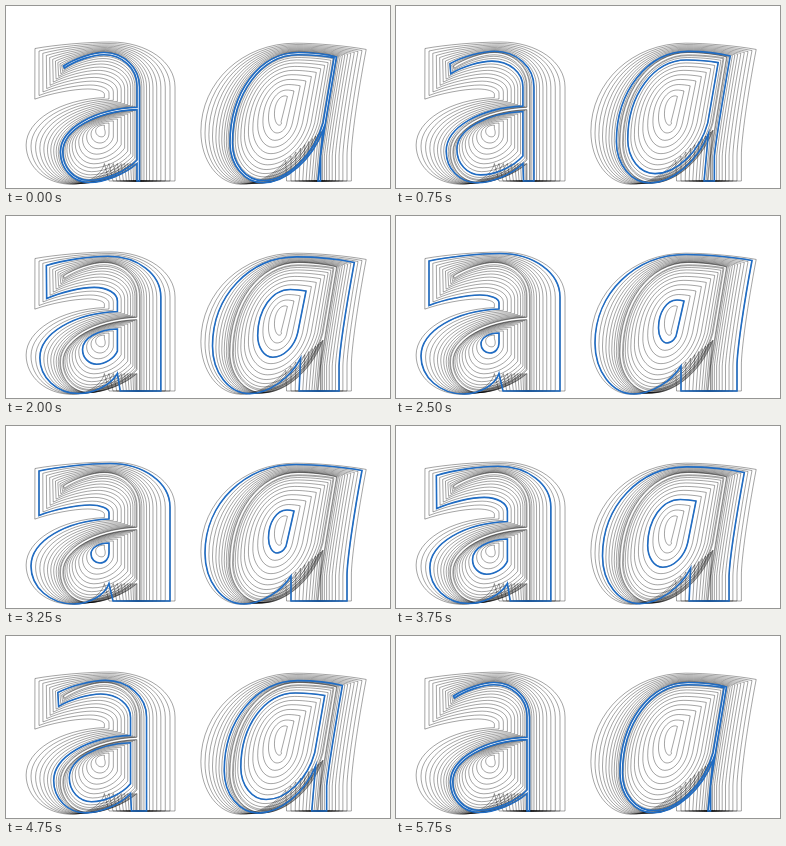
Write an HTML page with a canvas that moves like this. It is 384 by 182 pixels and loops after 6000 ms.

```html
<!DOCTYPE html>
<html lang="en">
<head>
<meta charset="utf-8">
<title>Variable letter weights</title>
<style>
  html, body { margin: 0; width: 100%; height: 100%; overflow: hidden; background: #fff; }
  canvas { display: block; width: 384px; height: 182px; }
</style>
</head>
<body>
<canvas id="stage" width="384" height="182"></canvas>
<script>
const ctx = document.getElementById('stage').getContext('2d');
const STEP_MS = 250;
const WEIGHT_COUNT = 12;
const BASELINE = 175;

// Adds contours to a path; curves are rounded corners or quarter ellipses.
class Pen {
  constructor(path) { this.path = path; }
  move(x, y) { this.path.moveTo(x, y); return this.at(x, y); }
  line(x, y) { this.path.lineTo(x, y); return this.at(x, y); }
  at(x, y) { this.x = x; this.y = y; return this; }
  round(cx, cy, x, y) {
    const toward = (from, to) => from + (to - from) * .56;
    this.path.bezierCurveTo(toward(this.x, cx), toward(this.y, cy),
                            toward(x, cx), toward(y, cy), x, y);
    return this.at(x, y);
  }
  fromHorizontal(x, y) { return this.round(x, this.y, x, y); }
  fromVertical(x, y) { return this.round(this.x, y, x, y); }
  close() { this.path.closePath(); return this; }
}

const mixer = t => (thin, heavy) => thin + (heavy - thin) * t;

function addRoman(pen, mix, mixArch) {
  const stemRight = mix(133.5, 164);
  const stemLeft = mix(131, 103);
  const top = mix(46.5, 37.5);
  const tip = mix(57.5, 33);
  const tipBottom = mixArch(62, 89.5);
  const archBottom = mixArch(48.8, 79);
  const bowlLeft = mix(54.5, 25);
  const bowlBottom = mix(176.5, 178);
  const bowlTop = mix(101.3, 93);
  const eyeTop = mix(103.6, 117);
  const eyeLeft = mix(56.8, 85);
  const eyeBottom = mix(174.3, 137);

  pen.move(stemRight, BASELINE)
    .line(stemRight, 81)
    .fromVertical(mix(98, 104), top)
    .round(mix(78, 66), top, tip, mix(60, 45))
    .line(tip + mix(1, 0), tipBottom)
    .round(mix(78, 60), archBottom, mix(98, 84), archBottom)
    .fromHorizontal(stemLeft, mix(80, 87))
    .line(stemLeft, bowlTop)
    .round(bowlLeft, bowlTop + 3, bowlLeft, mix(146, 140))
    .fromVertical(mix(83, 68), bowlBottom)
    .round(mix(110, 96), bowlBottom, stemLeft, 157.5)
    .line(mix(131, 107), BASELINE)
    .close();

  pen.move(stemLeft, eyeTop)
    .line(stemLeft, mix(154, 127))
    .round(mix(112, 103), eyeBottom, mix(83, 94), eyeBottom)
    .fromHorizontal(eyeLeft, mix(146, 128))
    .round(eyeLeft, eyeTop + mix(3, 0), stemLeft, eyeTop)
    .close();
}

function addItalic(pen, mix) {
  const tipX = mix(330.5, 356);
  const tipY = mix(51, 44.5);
  const stemRight = mix(314.5, 341);
  const stemLeft = mix(312, 285);
  const top = mix(46.5, 38.5);
  const bowlLeft = mix(224, 199);
  const bowlBottom = mix(176.8, 178);
  const eyeTop = mix(48.8, 84);
  const eyeLeft = mix(226.5, 262.5);
  const eyeBottom = mix(174.5, 127);

  pen.move(tipX, tipY)
    .round(mix(317, 341), mix(130, 124), stemRight, 150)
    .line(stemRight, BASELINE)
    .line(stemLeft, BASELINE)
    .line(mix(317, 285), mix(124, 150))
    .round(mix(298, 268), bowlBottom, mix(257, 238), bowlBottom)
    .fromHorizontal(bowlLeft, mix(137, 127))
    .fromVertical(mix(292, 290), top)
    .round(mix(315, 325), top, tipX, tipY)
    .close();

  pen.move(mix(328, 288), eyeTop + mix(3, 1))
    .round(mix(313, 284), eyeTop, mix(292, 281), eyeTop)
    .fromHorizontal(eyeLeft, mix(137, 112))
    .fromVertical(mix(257, 271), eyeBottom)
    .round(mix(301, 280), eyeBottom, mix(317, 281), mix(117, 116))
    .close();
}

const outlines = Array.from({ length: WEIGHT_COUNT }, (_, i) => {
  const path = new Path2D();
  const pen = new Pen(path);
  const mix = mixer((i / 10) ** 1.6);
  addRoman(pen, mix, mixer((i / 10) ** 1.3));
  addItalic(pen, mix);
  return path;
});

function draw() {
  const step = Math.floor(performance.now() / STEP_MS) % (2 * WEIGHT_COUNT);
  const active = Math.min(step, 2 * WEIGHT_COUNT - 1 - step);
  ctx.fillStyle = '#fff';
  ctx.fillRect(0, 0, 384, 182);
  ctx.lineWidth = .8;
  ctx.strokeStyle = 'rgba(0, 0, 0, .45)';
  outlines.forEach(path => ctx.stroke(path));
  ctx.lineWidth = 1.6;
  ctx.strokeStyle = '#1f6cc4';
  ctx.stroke(outlines[active]);
  requestAnimationFrame(draw);
}

draw();
</script>
</body>
</html>
```
